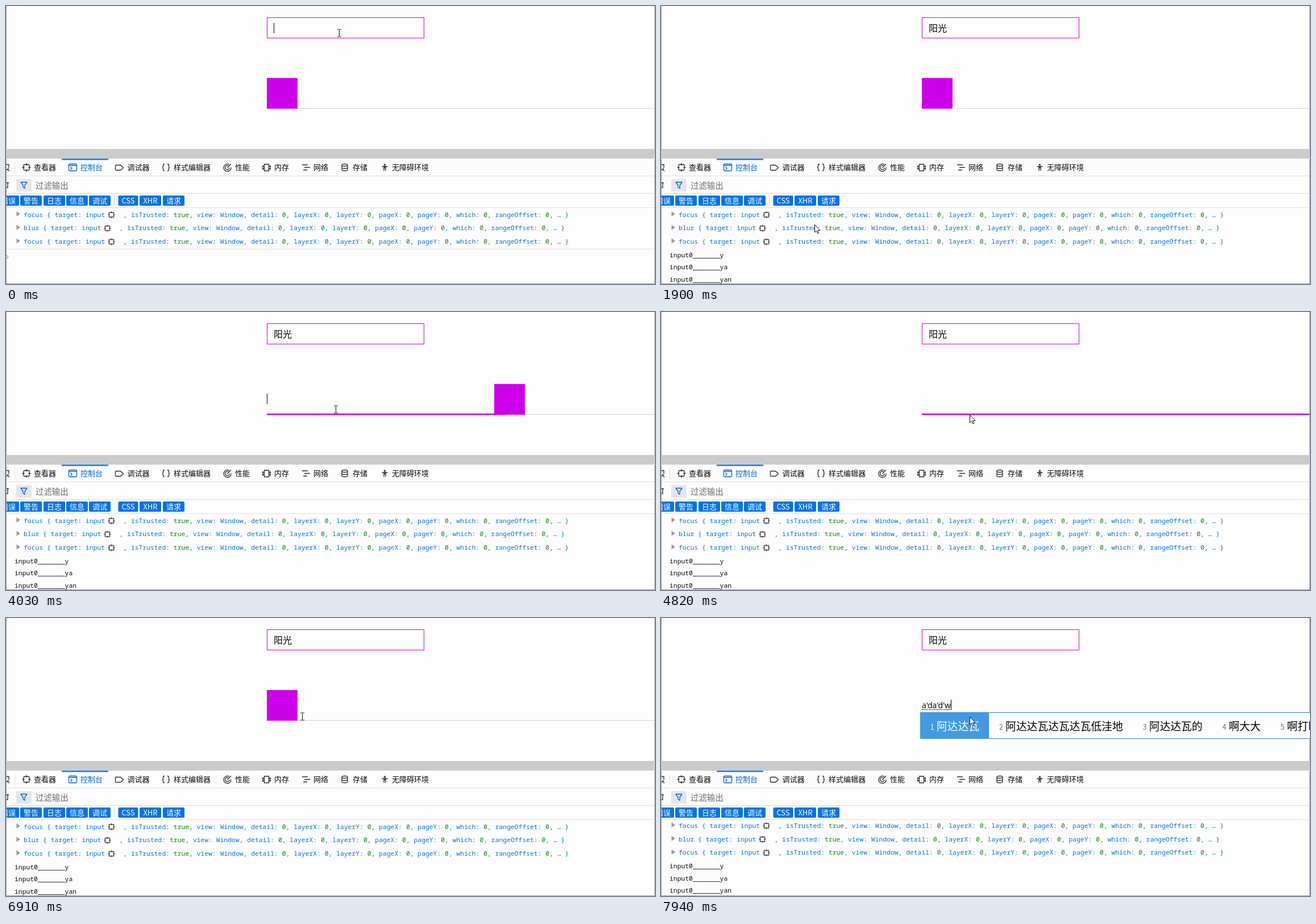
An HTML page that plays this animation: 1142x490 px, repeating every 8 s.

```html
<!DOCTYPE html>
<html lang="zh-CN">
<head>
<meta charset="utf-8">
<title>Input focus demo</title>
<style>
  html, body { margin: 0; width: 100%; height: 100%; overflow: hidden; background: #fdfdfd; }
  svg { display: block; width: 1142px; height: 490px; }
  text { white-space: pre; font-family: "Noto Sans CJK SC", "Noto Sans CJK", sans-serif; fill: #0c0c0d; }
  .tab { font-size: 13px; }
  .chip { font-size: 13px; fill: #fff; text-anchor: middle; }
  .mono { font: 11.37px "Noto Sans Mono", "DejaVu Sans Mono", monospace; }
  .obj { fill: #0074e8; }
  .val { fill: #058b00; }
  .field { font-size: 16px; fill: #000; }
  .comp { font: 14px "Open Sans", "Noto Sans", sans-serif; fill: #000; }
  .cand { font-size: 18.8px; fill: #000; }
  .num { font-size: 13px; fill: #777; }
  .on { fill: #fff; }
  .icon { fill: none; stroke: #2a2a2e; stroke-width: 1.3; }
  .accent { fill: #cd00ea; }
</style>
</head>
<body>
<svg viewBox="0 0 1142 490">
  <defs>
    <clipPath id="pane"><rect y="356" width="1142" height="134"/></clipPath>
    <clipPath id="page"><rect width="1141" height="252"/></clipPath>
  </defs>
  <rect width="1142" height="490" fill="#fdfdfd"/>

  <g clip-path="url(#page)">
    <rect x="459.5" y="20.5" width="276" height="36" fill="none" stroke="#cd00ea"/>
    <text id="word" class="field" x="471" y="44.5"></text>
    <rect x="459" y="180" width="683" height="1" fill="#d2d2d2"/>
    <rect id="bar" class="accent" x="459" y="179" height="2.5"/>
    <rect id="box" class="accent" y="127" width="54" height="54"/>
  </g>

  <rect y="252" width="1142" height="17" fill="#cbcbcb"/>
  <g fill="#e0e0e2">
    <rect y="299" width="1142" height="1"/>
    <rect y="330" width="1142" height="1"/>
    <rect y="355" width="1142" height="1"/>
    <rect x="15" y="275" width="1" height="20"/>
    <rect x="190" y="335" width="1" height="16"/>
  </g>
  <rect x="98" y="269" width="82" height="2.5" fill="#0a84ff"/>
  <g id="tabs"></g>

  <g class="icon">
    <path d="M0 279.5H5V285M0 290L5 286M2 287L6 291"/>
    <path d="M0 311.5H5M3 312V320H0"/>
    <rect x="31" y="279.5" width="10" height="10" rx="1.5"/>
    <path d="M36 277V281M36 288V292M28.500 284.500H32.500M39.500 284.500H43.500"/>
    <g stroke="#0060df">
      <rect x="110.500" y="278.500" width="14" height="12" rx="1.500"/>
      <path d="M111 281H124M113.500 283.500L116 286L113.500 288.500"/>
    </g>
    <path d="M193.500 280.500H201.500L206.500 285L201.500 289.500H193.500Q192.500 289.500 192.500 288V282Q192.500 280.500 193.500 280.500Z"/>
    <path d="M279 278.500Q276.500 278.500 276.500 281V283Q276.500 284.500 275 284.500Q276.500 284.500 276.500 286V288Q276.500 290.500 279 290.500M284 278.500Q286.500 278.500 286.500 281V283Q286.500 284.500 288 284.500Q286.500 284.500 286.500 286V288Q286.500 290.500 284 290.500"/>
    <path d="M393 279.500A6.500 6.500 0 1 0 396 284.500M391.500 281.500A3.800 3.800 0 1 0 393.200 285M389.500 285L396 278.500"/>
    <path d="M454.500 279V290.500H462.500V279ZM452 281V288.500M465 281V288.500M451 282.500H454M451 287H454M463 282.500H466M463 287H466"/>
    <path d="M521 280H531M525 284.500H535M523 289H530"/>
    <ellipse cx="596" cy="280.500" rx="5" ry="2"/>
    <path d="M591 280.500V288.500A5 2 0 0 0 601 288.500V280.500M591 284.500A5 2 0 0 0 601 284.500"/>
    <circle cx="666.500" cy="280" r="1.200"/>
    <path d="M661.500 283H671.500M666.500 283V286.500M665 283V290.500M668 283V290.500"/>
  </g>

  <rect x="18" y="305" width="27" height="22" rx="2" fill="#e6e6ea"/>
  <path d="M26 310.500H37L33 316V321.500L30 319.500V316Z" fill="none" stroke="#0060df" stroke-width="1.300" stroke-linejoin="round"/>
  <text x="52" y="321.500" style="font-size:14.400px;fill:#6c6c70">过滤输出</text>
  <g id="chips"></g>

  <g clip-path="url(#pane)">
    <g id="console"></g>
    <g id="prompt">
      <rect y="428" width="1142" height="1" fill="#e0e0e2"/>
      <path d="M0.500 439L4 442.500L0.500 446" fill="none" stroke="#a0a0a4" stroke-width="1.200"/>
    </g>
  </g>

  <path d="M0.500 0V252M0.500 270V490M1141.500 0V252M1141.500 270V490M0 489.500H1142" stroke="#9b9b9b" fill="none"/>

  <text id="comp" class="comp"></text>
  <path id="dots" stroke="#000" stroke-dasharray="2 1" fill="none"/>
  <rect id="caret" width="1" height="18"/>
  <g id="popup"></g>
  <path id="arrow" d="M0.500 0.500V14L3.600 11.200L5.700 16L7.800 15.100L5.700 10.500H10Z" fill="#fff" stroke="#111"/>
  <path id="beam" d="M-3.500 -6.500H-1L0 -5.500L1 -6.500H3.500M0 -5.500V5.500M-3.500 6.500H-1L0 5.500L1 6.500H3.500" fill="none" stroke="#111"/>
</svg>

<script>
const LOOP = 8000;
const el = id => document.getElementById(id);
const put = (id, attrs) => { for (const k in attrs) el(id).setAttribute(k, attrs[k]); };
const show = (id, on) => { el(id).style.display = on ? '' : 'none'; };
const text = (cls, x, y, s) => `<text class="${cls}" x="${x}" y="${y}">${s}</text>`;

// toolbar
el('tabs').innerHTML = [
  [49, '查看器'], [131, '控制台'], [213.5, '调试器'], [295, '样式编辑器'], [403, '性能'],
  [472, '内存'], [541, '网络'], [610, '存储'], [679, '无障碍环境']
].map(([x, s], i) => `<text class="tab" x="${x}" y="289"${i === 1 ? ' style="fill:#0060df"' : ''}>${s}</text>`).join('');

el('chips').innerHTML = [
  [-15, 38, '错误'], [25, 38, '警告'], [66, 38, '日志'], [106, 38, '信息'], [146, 38, '调试'],
  [197.5, 35, 'CSS'], [235, 38, 'XHR'], [276, 38, '请求']
].map(([x, w, s]) => `<rect x="${x}" y="334" width="${w}" height="18" rx="2" fill="#0074e8"/>` +
  text('chip', x + w / 2, 347.5, s)).join('');

// console
const CH = 6.822;
const rest = ', isTrusted: true, view: Window, detail: 0, layerX: 0, layerY: 0, pageX: 0, pageY: 0, which: 0, rangeOffset: 0, … }'
  .replace(/: (true|0)/g, ': <tspan class="val">$1</tspan>');

function eventRow(name, y) {
  const head = name + ' { target: input';
  const end = 31 + head.length * CH;
  return `<path d="M18.500 ${y - 9.5}L25 ${y - 5}L18.500 ${y - 0.5}Z" fill="#9a9a9e"/>` +
    text('mono obj', 31, y, head) +
    `<g transform="translate(${Math.round(end) + 11.5} ${y - 3.5})" fill="none" stroke="#4a4a4f" stroke-width="1.500">` +
    '<rect x="-4" y="-4" width="8" height="8"/><path d="M0 -6V-3M0 3V6M-6 0H-3M3 0H6"/></g>' +
    text('mono obj', end + 32, y, rest);
}

const logs = ['y', 'ya', 'yan'];
el('console').innerHTML = ['focus', 'blur', 'focus'].map((n, i) => eventRow(n, 371.5 + i * 23.8)).join('') +
  logs.map((s, i) => `<g id="log${i}">${text('mono', 15, 443 + i * 21.4, 'input0_______' + s)}</g>`).join('');

// time: the screen updates in runs of [first, last, count]
const steps = [
  [150, 740, 5], [1060, 1060, 1], [1350, 2320, 8], [2450, 3440, 8], [3590, 3590, 1],
  [3900, 4550, 6], [4820, 4960, 2], [5370, 5650, 3], [6220, 7180, 8], [7340, 7940, 5]
].flatMap(([a, b, n]) => Array.from({ length: n }, (_, i) =>
  Math.floor((a + (n > 1 ? (b - a) * i / (n - 1) : 0)) / 10) * 10));
const snap = t => steps.reduce((s, v) => v <= t ? v : s, 0);

// CSS "ease" curve
function ease(x) {
  if (x <= 0) return 0;
  if (x >= 1) return 1;
  let lo = 0, hi = 1, s;
  for (let i = 0; i < 30; i++) {
    s = (lo + hi) / 2;
    if (0.75 * s * (1 - s) + s ** 3 < x) lo = s; else hi = s;
  }
  return 0.3 * (1 - s) ** 2 * s + 3 * (1 - s) * s * s + s ** 3;
}

const FOCUS = 3885, BLUR = 6075, REFOCUS = 6960, FADE = 600, WIDTH = 1080;
const progress = t =>
  t >= REFOCUS ? ease((t - REFOCUS) / FADE) :
  t >= BLUR ? 1 - ease((t - BLUR) / FADE) :
  ease((t - FOCUS) / FADE);

// pointer: [time, x, y]
const track = [
  [0, 587, 47], [1060, 587, 47], [1350, 575, 75], [1620, 430, 260], [2040, 190, 448], [2320, 153, 440],
  [2450, 168, 428], [2730, 380, 320], [3010, 579, 221], [3150, 586, 200], [3440, 590, 165], [3590, 581, 171],
  [4160, 581, 171], [4550, 590, 169], [4820, 543, 181], [4960, 523, 183], [5370, 500, 184],
  [5650, 357, 186], [6075, 357, 186], [6220, 410, 211], [6350, 458, 203], [6490, 490, 188],
  [6630, 522, 173], [6900, 522, 173], [7040, 543, 174], [LOOP, 543, 174]
];
function pointer(t) {
  const i = track.findIndex(k => k[0] > t);
  const [t0, x0, y0] = track[i - 1], [t1, x1, y1] = track[i];
  const f = (t - t0) / (t1 - t0);
  return [Math.round(x0 + (x1 - x0) * f), Math.round(y0 + (y1 - y0) * f)];
}

// input method: [time, letters, candidates]
const typing = [
  [150, 'y', '有 一 要 用 也 与 由'],
  [290, 'yan', '眼 言 严 烟 盐 研 演'],
  [440, "yang'g", '阳光 样个 洋 养 样 扬 羊'],
  [590, "yang'gua", '阳刮 养瓜 洋瓜 样 养 阳 羊'],
  [740, "yang'guang", '阳光 仰光 洋光 养光 扬光 样光 羊光'],
  [1060, '', ''],
  [7340, 'a', '啊 阿 吖 呵 锕 嗄 腌'],
  [7490, "a'd", '阿的 啊的 暗淡 安定 爱戴 按到 案底'],
  [7640, "a'da", '阿达 啊大 啊打 阿大 啊达 啊搭 阿打'],
  [7790, "a'da'd", '阿达的 啊大的 啊打断 阿大的 啊达到 啊搭档 阿打的'],
  [7940, "a'da'd'w", '阿达达瓦 阿达达瓦达瓦达瓦低洼地 阿达达瓦的 啊大大 啊打断 啊大 阿达']
];

function popup(x, y, list) {
  let left = x, out = '';
  list.split(' ').forEach((s, i) => {
    const w = 46 + 18.8 * s.length, on = i ? '' : ' on';
    if (!i) out += `<rect x="${x}" y="${y}" width="${w}" height="47" fill="#429ae2"/>`;
    out += text('num' + on, left + 17.5, y + 31, i + 1) + text('cand' + on, left + 29, y + 32, s);
    left += w;
  });
  return `<rect x="${x + 0.5}" y="${y + 0.5}" width="${left + 88 - x}" height="46" fill="#fdfdfd" stroke="#1f83d6"/>` + out;
}

const within = (t, ...spans) => spans.some(([a, b]) => t >= a && t < b);

function draw(now) {
  const t = snap(now % LOOP);

  const p = progress(t);
  put('bar', { width: WIDTH * p });
  put('box', { x: 459 + (WIDTH - 54) * p });

  const entry = typing.filter(k => k[0] <= t).pop();
  const letters = entry ? entry[1] : '';
  const second = t >= FOCUS;
  const x = second ? 459 : 471, y = second ? 145 : 30;
  const done = t >= 1060;
  el('word').textContent = done ? '阳光' : '';
  el('comp').textContent = letters;
  put('comp', { x, y: y + 14 });
  const w = letters ? el('comp').getComputedTextLength() : 0;
  put('dots', { d: letters ? `M${x} ${y + 16.5}H${x + w}` : '' });
  put('caret', { x: Math.round(letters ? x + w : second ? x : done ? 503 : 471), y: y - (second ? 1 : 0) });
  show('caret', within(t, [0, 1480], [2040, 2580], [3010, 3440], [3900, 4420], [4960, 5500], [6960, LOOP]));
  el('popup').innerHTML = letters ? popup(x - 3, y + 21, entry[2]) : '';

  const count = done ? 3 : Math.min(3, letters.length);
  logs.forEach((_, i) => show('log' + i, i < count));
  put('prompt', { transform: `translate(0 ${count * 21.4})` });
  show('prompt', count < 3);
  put('console', { transform: `translate(0 ${t >= 7340 ? -1.7 : 0})` });

  const [mx, my] = pointer(t);
  const inFirst = mx > 459 && mx < 736 && my > 20 && my < 57;
  const inSecond = mx > 459 && my > 144 && my < 181;
  const beam = inFirst || (inSecond && t < 7340);
  show('beam', beam);
  show('arrow', !beam);
  put('beam', { transform: `translate(${mx - 0.5} ${my + 0.5})` });
  put('arrow', { transform: `translate(${mx} ${my})` });
}

const start = performance.now();
function tick() {
  draw(performance.now() - start);
  requestAnimationFrame(tick);
}
tick();
</script>
</body>
</html>
```
